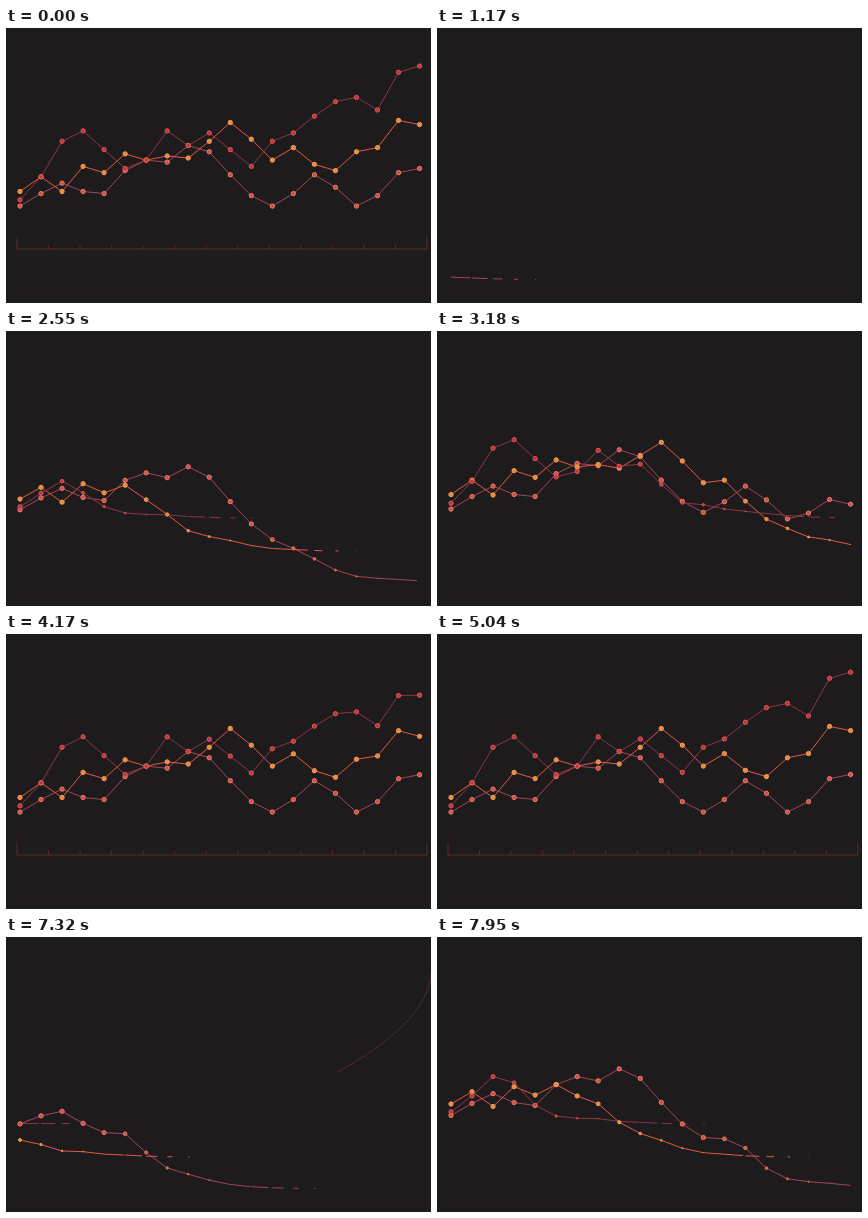
An HTML page that plays this animation: 425 px wide and 275 px high, repeating every 8 s.

```html
<!DOCTYPE html>
<html lang="en">
<head>
<meta charset="utf-8">
<title>Line chart</title>
<style>
  html, body { margin: 0; width: 100%; height: 100%; overflow: hidden; background: #1d1b1b; }
  svg { display: block; width: 425px; height: 275px; }
  path, line { fill: none; stroke-width: 1; }
  .axis { stroke: #5c2d25; }
</style>
</head>
<body>
<svg id="chart" viewBox="0 0 425 275">
  <path id="arc" pathLength="1" stroke="#552b2f"
    d="M11 235C95 222 180 203 259 170C340 136 423 88 425 36"/>
  <path id="axis" class="axis" pathLength="1" d="M11 209V221H421V209"/>
</svg>
<script>
const LOOP = 8000;
const BUILD = 4260;     // ms until the chart is complete
const STAGGER = 77.6;   // ms between neighbouring points
const TICK_GAP = 410 / 13;

// Chart values, counted in units of 2.09 px above y = 178
const series = [
  { base: 251.5, lag: 0, line: '#a2465a', fill: '#cf4a4c', ring: '#ee8468',
    values: [0, 6, 11, 7, 6, 17, 22, 21, 29, 26, 15, 5, 0, 6, 15, 9, 0, 5, 16, 18] },
  { base: 220, lag: 6, line: '#e2584a', fill: '#e98a3c', ring: '#f5a058',
    values: [7, 14, 7, 19, 16, 25, 22, 24, 23, 31, 40, 32, 22, 28, 20, 17, 26, 28, 41, 39] },
  { base: 187, lag: 10.5, line: '#8c3549', fill: '#bd3341', ring: '#e25a58',
    values: [3, 14, 31, 36, 27, 18, 22, 36, 29, 35, 27, 19, 31, 35, 43, 50, 52, 46, 64, 67] }
];
const xOf = k => 14 + 21.03 * k;
const yOf = v => 178.1 - 2.09 * v;

const clamp = v => Math.min(1, Math.max(0, v));
const inOut = n => t => t < .5 ? (2 * t) ** n / 2 : 1 - (2 - 2 * t) ** n / 2;
const inOutQuad = inOut(2), inOutCubic = inOut(3);
const outCubic = t => 1 - (1 - t) ** 3;

// Same curve as CSS cubic-bezier(x1, 0, x2, 1)
const bezier = (x1, x2) => x => {
  if (x <= 0 || x >= 1) return clamp(x);
  let lo = 0, hi = 1;
  for (let i = 0; i < 18; i++) {
    const t = (lo + hi) / 2, u = 1 - t;
    if (3 * u * u * t * x1 + 3 * u * t * t * x2 + t ** 3 < x) lo = t; else hi = t;
  }
  return lo * lo * (3 - 2 * lo);
};
const rise = bezier(.62, .02);
const radius = p => 2.65 * (1 - (1 - clamp((p - 4) / 7.5)) ** 1.5);

const svg = document.getElementById('chart');
const arc = document.getElementById('arc');
const axis = document.getElementById('axis');

function set(el, attrs) {
  for (const k in attrs) el.setAttribute(k, attrs[k]);
}
function add(tag, attrs) {
  const el = document.createElementNS('http://www.w3.org/2000/svg', tag);
  set(el, attrs);
  return svg.appendChild(el);
}
const show = on => on ? 'visible' : 'hidden';

function trim(el, from, to) {
  set(el, {
    visibility: show(to - from > .002),
    'stroke-dasharray': `${Math.max(0, to - from)} 2`,
    'stroke-dashoffset': -from
  });
}

const ticks = Array.from({ length: 12 }, (_, i) => {
  const x = 11 + TICK_GAP * (i + 1);
  return add('line', { class: 'axis', x1: x, x2: x, y1: 217, y2: 221 });
});
for (const s of series) {
  s.lines = s.values.slice(1).map(() => add('line', { stroke: s.line }));
}
for (const s of series) {
  s.dots = s.values.map((_, k) => add('circle', { cx: xOf(k), fill: s.fill, stroke: s.ring }));
}

function drawSeries(s, phase) {
  const pts = s.values.map((v, k) => {
    const p = phase - s.lag - k;
    return { p, x: xOf(k), y: s.base + (yOf(v) - s.base) * rise(p / 26) };
  });
  s.lines.forEach((el, k) => {
    const a = pts[k], b = pts[k + 1];
    const part = inOutQuad(clamp((a.p + .6) / 6));
    set(el, {
      x1: a.x, y1: a.y,
      x2: a.x + (b.x - a.x) * part, y2: a.y + (b.y - a.y) * part,
      visibility: show(part > 0)
    });
  });
  s.dots.forEach((el, k) => {
    const r = radius(pts[k].p), ring = Math.min(1, r * .6);
    set(el, { cy: pts[k].y, r: r - ring / 2, 'stroke-width': ring, visibility: show(r > 0) });
  });
}

function draw(age) {
  const phase = age / STAGGER + 1;
  for (const s of series) drawSeries(s, phase);

  const sweep = delay => outCubic(clamp((age - delay) / 620));
  trim(arc, sweep(841), sweep(400));

  const drawn = inOutCubic(clamp((age - 2620) / 640));
  trim(axis, 0, drawn);
  ticks.forEach((el, i) => {
    set(el, { visibility: show(drawn * 434 - 12 > TICK_GAP * (i + 1)) });
  });
}

// The picture is held between steps; the chart restarts twice per loop
const runs = [
  { at: 930 - 5340, step: 125.3 },
  { at: 930, step: 125.3 },
  { at: 6270, step: 131 }
];
function ageAt(t) {
  const { at, step } = runs.findLast(r => r.at <= t);
  return Math.min(BUILD, Math.floor((t - at + 40) / step) * step);
}

const start = performance.now();
let shown = -1;
function tick() {
  const age = ageAt(Math.max(0, performance.now() - start) % LOOP);
  if (age !== shown) draw(shown = age);
  requestAnimationFrame(tick);
}
tick();
</script>
</body>
</html>
```
